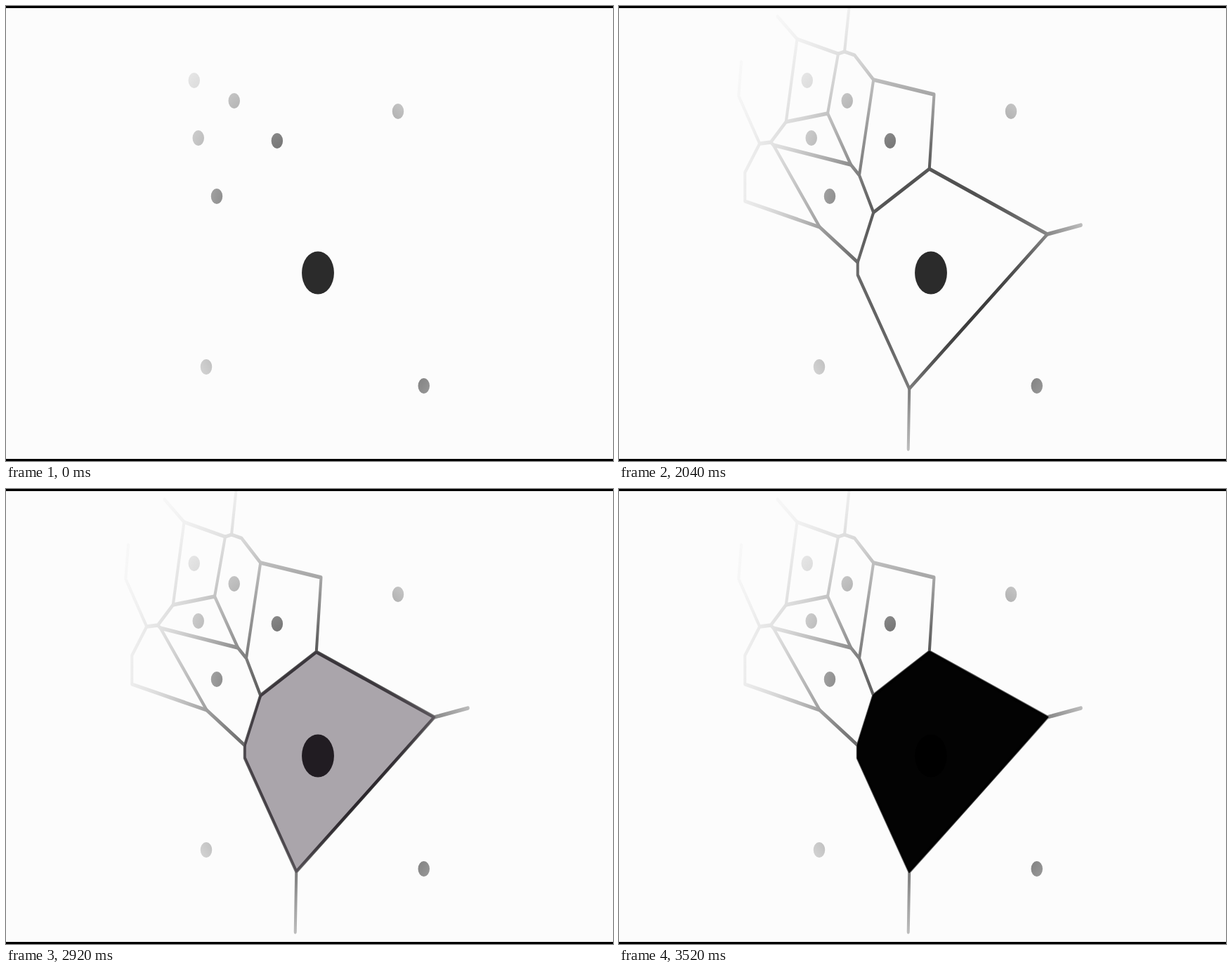
These frames come from a looping animation (864 px wide and 648 px high, 5 s). An HTML page:

```html
<!DOCTYPE html>
<html lang="en">
<head>
<meta charset="utf-8">
<title>Cell growth</title>
<style>
  html, body { margin: 0; width: 100%; height: 100%; overflow: hidden; background: #fcfcfc; }
  svg { display: block; width: 100%; height: 100%; }
  path { stroke-linecap: round; stroke-linejoin: round; }
  #edges { fill: none; stroke: url(#fade); stroke-width: 5.4; }
  #dots { stroke: url(#fade); stroke-width: 22; }
  #cell { stroke-width: 3; stroke-linejoin: miter; }
</style>
</head>
<body>
<svg viewBox="0 0 864 648" preserveAspectRatio="none">
  <defs>
    <radialGradient id="fade" gradientUnits="userSpaceOnUse" cx="0" cy="0" r="430"
      gradientTransform="translate(622 377) rotate(45) scale(1.2 1)"></radialGradient>
  </defs>
  <!-- The drawing is squeezed horizontally, circles and strokes included. -->
  <g transform="scale(.75 1)">
    <g id="edges">
      <path d="M589 232L813 325L551 545L453 383V365L483 294Z"/>
      <path d="M813 325L877 312M551 545L549 631"/>
      <path d="M453 365L381 315L293 198L440 226L456 241L483 294M456 241L483 105"/>
      <path d="M381 315L239 278V237L267 196L288 194L317 165L396 153L440 226M288 194L293 198"/>
      <path d="M267 196L227 128L232 80"/>
      <path d="M301 15L338 47L416 68L428 65L447 70L483 105L598 126L589 232"/>
      <path d="M317 165L338 47M396 153L416 68M428 65L437 0"/>
    </g>
    <path id="dots" d="M357 106h0M433 135h0M365 188h0M514.5 192h0M744 150h0M400 271h0M380 514h0M793 541h0"/>
    <circle cx="592" cy="380" r="30.6" fill="#2b2b2b"/>
    <path id="cell" d="M589 232L813 325L551 545L453 383V365L483 294Z"/>
  </g>
  <path d="M0 0H864V3H0zM0 645H864V648H0z"/>
</svg>
<script>
  const LOOP = 5000, STEP = 40;
  const fade = document.getElementById('fade');
  const edges = document.getElementById('edges');
  const cell = document.getElementById('cell');

  // Ink thins out from the centre along a bell curve.
  const STOPS = 24;
  for (let i = 0; i <= STOPS; i++) {
    const radius = 430 * i / STOPS;
    const grey = Math.round(252 - 200 * Math.exp(-((radius / 242) ** 2.6)));
    const stop = document.createElementNS('http://www.w3.org/2000/svg', 'stop');
    stop.setAttribute('offset', i / STOPS);
    stop.setAttribute('stop-color', `rgb(${grey},${grey},${grey})`);
    fade.append(stop);
  }

  const progress = (t, from, to) => Math.min(1, Math.max(0, (t - from) / (to - from)));

  function draw(elapsed) {
    const t = Math.floor((elapsed % LOOP) / STEP) * STEP;
    edges.style.opacity = t < 1240 ? 0 : progress(t, 1160, 2040);

    // The fill starts slightly violet and turns black.
    const tint = 1 - progress(t, 2800, 3200);
    const color = `rgb(${20 * tint},0,${24 * tint})`;
    cell.style.fill = cell.style.stroke = color;
    cell.style.opacity = progress(Math.min(t, 3520), 2600, 3535);
  }

  let start;
  function tick(now) {
    start ??= now;
    draw(now - start);
    requestAnimationFrame(tick);
  }
  draw(0);
  requestAnimationFrame(tick);
</script>
</body>
</html>
```
